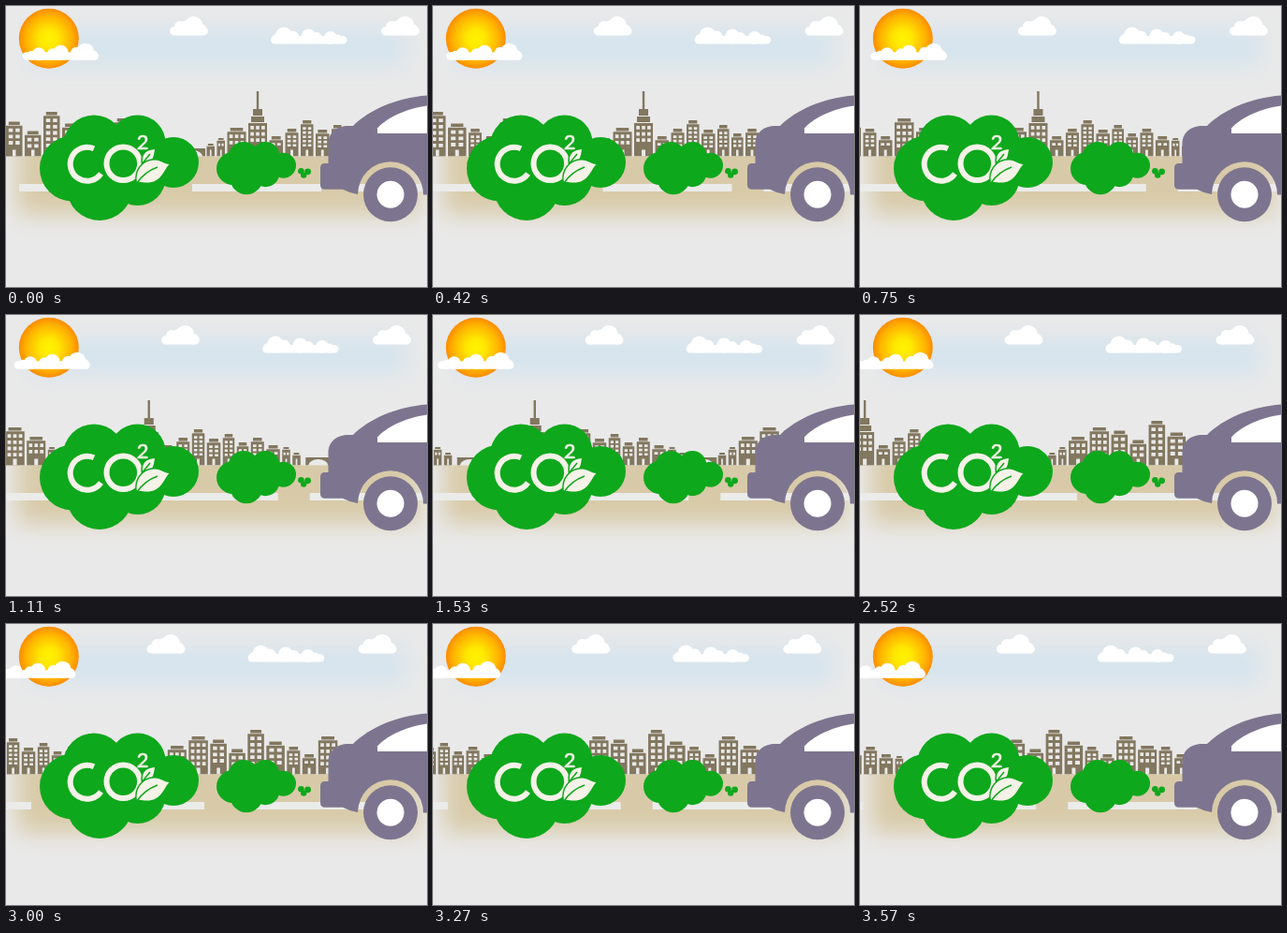
An HTML page that plays this animation: 450 px wide and 300 px high, repeating every 3600 ms.

```html
<!DOCTYPE html>
<html lang="en">
<head>
<meta charset="utf-8">
<title>Exhaust clouds</title>
<style>
html, body { margin: 0; width: 100%; height: 100%; overflow: hidden; background: #e9e9e9; }
svg { display: block; width: 450px; height: 300px; }
</style>
</head>
<body>
<svg viewBox="0 0 450 300" role="img" aria-label="Car leaving clouds of CO2">
  <defs>
    <radialGradient id="sunFill">
      <stop offset="0" stop-color="#fff200"/>
      <stop offset=".3" stop-color="#ffe800"/>
      <stop offset=".75" stop-color="#ffb400"/>
      <stop offset="1" stop-color="#fb8c00"/>
    </radialGradient>
    <filter id="soft" x="-20%" y="-100%" width="140%" height="300%">
      <feGaussianBlur stdDeviation="12"/>
    </filter>
    <clipPath id="land"><path d="M0 160.5H450V300H0z"/></clipPath>
    <g id="longCloud">
      <rect y="9.5" width="81.5" height="8.5" rx="4.2"/>
      <circle cx="6" cy="12.5" r="5"/>
      <circle cx="14" cy="9" r="9"/>
      <circle cx="23.5" cy="10.5" r="6.5"/>
      <circle cx="40.5" cy="10" r="8"/>
      <circle cx="49" cy="11.5" r="6"/>
      <circle cx="64" cy="11.5" r="7"/>
      <circle cx="71.5" cy="13" r="5"/>
    </g>
    <g id="shortCloud">
      <rect y="11" width="41" height="9.5" rx="4.7"/>
      <circle cx="11" cy="11" r="6"/>
      <circle cx="17" cy="10" r="5.5"/>
      <circle cx="25.5" cy="10" r="10"/>
      <circle cx="34" cy="14" r="5.5"/>
    </g>
    <g id="puff">
      <circle cx="35" cy="57" r="35"/>
      <circle cx="58" cy="33" r="33"/>
      <circle cx="104.6" cy="30" r="30"/>
      <circle cx="143" cy="50.5" r="27"/>
      <circle cx="64" cy="77.5" r="35"/>
      <circle cx="104.6" cy="66.5" r="30"/>
      <path d="M40 40H140V70H40z"/>
    </g>
  </defs>

  <rect width="450" height="300" fill="#e9e9e9"/>
  <rect x="25" y="24" width="402" height="40" fill="#d5e4ee" filter="url(#soft)"/>
  <circle cx="45.8" cy="34.8" r="32" fill="url(#sunFill)"/>
  <g id="sky" fill="#fff">
    <use href="#longCloud" transform="translate(99 39.7) scale(-1 1)"/>
    <use href="#shortCloud" x="175" y="11"/>
    <use href="#longCloud" x="283" y="22.5"/>
    <use href="#shortCloud" x="401" y="11"/>
  </g>
  <g id="town"></g>
  <g clip-path="url(#land)">
    <rect x="12" y="130" width="430" height="93" fill="#d8caa8" filter="url(#soft)"/>
  </g>
  <path id="road" stroke="#ebebea" stroke-width="8" stroke-dasharray="138 34" d="M14 194h138M199 194h310"/>

  <g fill="#0ea81c">
    <use href="#puff" transform="translate(36 116.5)"/>
    <use href="#puff" transform="translate(225 145) scale(.5)"/>
    <circle cx="315.4" cy="176.2" r="3.3"/>
    <circle cx="322.6" cy="176.8" r="3.4"/>
    <circle cx="318.2" cy="180.6" r="3.2"/>
  </g>

  <g fill="none" stroke="#f5f2e8" stroke-width="6">
    <path d="M94 152.3A18 18 0 1 0 101.5 179"/>
    <circle cx="125.3" cy="168.3" r="17.8"/>
  </g>
  <text x="139.8" y="153" font-family="Lato, sans-serif" font-size="22" fill="#f5f2e8" stroke="#f5f2e8" stroke-width=".7">2</text>
  <g fill="#f5f2e8" stroke="#0ea81c" stroke-width="3" paint-order="stroke">
    <path d="M146 167C145 158 150 153.500 159 153C158 160 157 166 151 167Z"/>
    <path d="M140 188C138 176 146 164.500 159 164.500C166 164.500 169 169 174.500 169C169 174 167 187 153 188.500C147 189 144 187 140 188Z"/>
    <path fill="none" stroke-width="1.5" d="M140 189Q148 177 162 172M145 169L154 158"/>
  </g>

  <path fill="#7d758f" d="M344.5 168V147C344.5 135 354 128 366 128H371C388 111 417 98 450 95.500V201.500H446A35 35 0 0 0 376 201Q368 200 360 195.700H341Q336 195.700 336 191V173Q336 168 341 168Z"/>
  <path fill="#fff" d="M397 136V130.500C405 121 426 109.500 450 106.500V136Z"/>
  <circle cx="411" cy="201.300" r="29" fill="#7d758f"/>
  <circle cx="411" cy="201.300" r="14.500" fill="#fff"/>
</svg>
<script>
const LOOP = 3600, STEP = 30, BASE = 160.5, GAP = 2.5;
const $ = id => document.getElementById(id);
const box = (x, y, w, h) => `M${x} ${y}h${w}v${h}h${-w}z`;

let walls = '', holes = '';

function windows(x, top, w) {
  const cols = Math.max(2, Math.floor(w / 6.6));
  const gap = w / (cols * 2.6 + 1), wide = gap * 1.6;
  const high = w > 16 ? 3.8 : 2.6;
  for (let y = top; y + high < BASE - 9; y += high * 1.75)
    for (let c = 0; c < cols; c++)
      holes += box(x + gap + c * (gap + wide), y, wide, high);
  holes += box(x + w * .4, BASE - 7, w * .2, 7);
}

function house(x, w, h) {
  const top = BASE - h, cap = w < 12 ? 2 : 3.5;
  walls += box(x + w * .16, top, w * .68, cap);
  walls += box(x, top + cap + .8, w, h - cap - .8);
  windows(x, top + cap + 3.8, w);
}

// stacked blocks, each narrower than the one below
function tower(x, w) {
  walls += box(x + w / 2 - 1.2, 91, 2.4, 19) + box(x + w * .25, 110, w * .5, 7) +
    box(x + w * .15, 118, w * .7, 6) + box(x, 125, w, BASE - 125);
  windows(x, 128, w);
}

function bridge(x) {
  walls += `M${x + 3} ${BASE}V152h27v8.5h-3a10.500 6.500 0 0 0 -21 0z`;
}

// plot width and height of each kind of house; T is the tower, = a bridge
const kinds = {
  A: [20, 37], B: [20, 27], C: [20, 47.5], D: [22, 35], E: [16.5, 29.5], F: [17, 21.5],
  G: [23, 40.5], H: [22.5, 30.5], I: [11, 19.5], J: [11, 13.5],
  K: [16, 38.5], L: [17, 28.5], M: [15, 33.5], N: [15, 24.5],
  T: [22.5], '=': [31.5]
};
let x = 0;
for (const kind of 'ABCDEFGHIJ=JIHTFEKLMNEFIJ=JIHGABCDEFGHEF') {
  const [plot, h] = kinds[kind];
  if (kind === 'T') tower(x, plot - GAP);
  else if (kind === '=') bridge(x);
  else house(x, plot - GAP, h);
  x += plot;
}
$('town').innerHTML = `<path fill="#82775f" d="${walls}"/><path fill="#e9e9e7" d="${holes}"/>`;

// pixels travelled leftwards during one loop
const drift = { sky: 29.3, town: 377, road: 150 };

function draw(now) {
  const t = Math.floor(now % LOOP / STEP) * STEP / LOOP;
  for (const id in drift)
    $(id).setAttribute('transform', `translate(${(-drift[id] * t).toFixed(2)} 0)`);
}

const start = performance.now();
function tick() {
  draw(performance.now() - start);
  requestAnimationFrame(tick);
}
tick();
</script>
</body>
</html>
```
